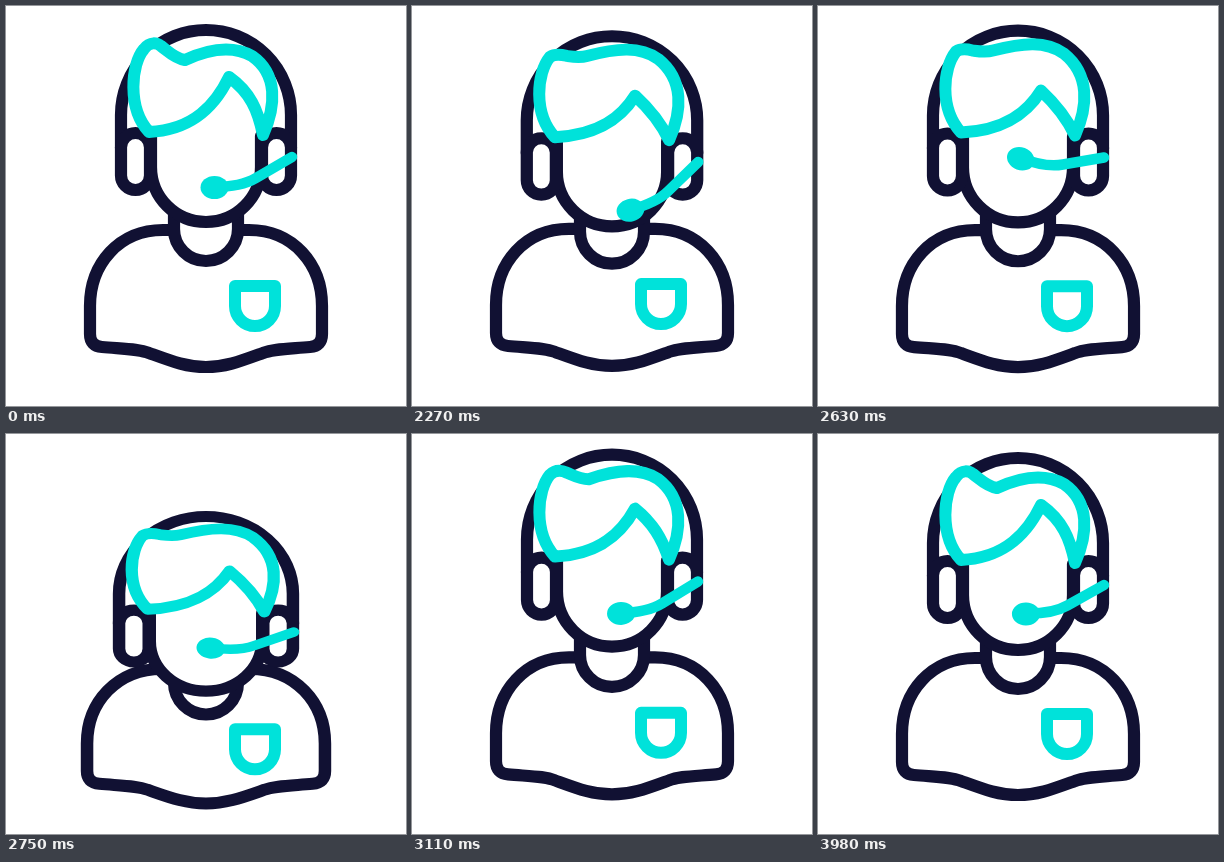
Recreate the animation shown at these times as an HTML page. Size 400x400 px, loop 4.01 s.

```html
<!DOCTYPE html>
<html lang="en">
<head>
<meta charset="utf-8">
<title>Support agent</title>
<style>
  html, body { margin: 0; width: 100%; height: 100%; overflow: hidden; background: #fff; }
  svg { display: block; width: 100%; height: 100%; }
  path, rect { fill: #fff; stroke: #111133; stroke-width: 12.2; stroke-linecap: round; stroke-linejoin: round; }
  .teal { stroke: #00e2da; stroke-width: 12; }
  .boom { fill: none; stroke-width: 10.5; }
  .dot { fill: #00e2da; }
</style>
</head>
<body>
<svg viewBox="0 0 400 400">
  <path id="body" d="M168 224H157C113 224 84 258 84 300V328Q84 340 96 341C120 343 133 343 143 347C165 355 180 361 200 361C220 361 235 355 257 347C267 343 280 343 304 341Q316 340 316 328V300C316 258 287 224 243 224H232"/>
  <path id="pocket" class="teal" d="M229 280H269V300A20 20 0 0 1 229 300Z"/>
  <path id="collar" d="M168 195V223A32 32 0 0 0 232 223V195"/>
  <g id="head">
    <path d="M115 142V109A85 85 0 0 1 285 109V142"/>
    <path d="M145 130V161A55 55 0 0 0 255 161V130"/>
    <rect x="115" y="127" width="29" height="57" rx="14.500"/>
    <rect x="256" y="127" width="29" height="57" rx="14.500"/>
    <path id="hair" class="teal"/>
    <g id="mic">
      <path class="teal boom" d="M286 151L250 172Q235 181 208 181"/>
      <ellipse class="dot" cx="208.500" cy="181.500" rx="14" ry="11.500"/>
    </g>
  </g>
</svg>
<script>
const LOOP = 4010, START = 2000, SECOND = 2630, MIC_PEAK = 2650;
const el = id => document.getElementById(id);
const clamp = x => Math.min(1, Math.max(0, x));
const arch = x => Math.sin(Math.PI * clamp(x));
const smooth = (a, b, t) => { const x = clamp((t - a) / (b - a)); return x * x * (3 - 2 * x); };

// A dip followed by a rise, each half a sine wave; down is positive.
const hop = (s, dipTime, riseTime, dip, rise) =>
  dip * arch(s / dipTime) - rise * arch((s - dipTime) / riseTime);

// The microphone swings up to its peak, then rings out.
function swing(t) {
  const grow = clamp((t - START) / 320);
  const fade = Math.exp(-Math.max(0, t - MIC_PEAK) / 500);
  return 21 * grow * fade * Math.cos(2 * Math.PI * (t - MIC_PEAK) / 630);
}

function hairPath(h) {
  return `M143 126C121 102 125 ${58 + 3 * h} 138 ${43 + 2 * h}
    C144 ${35 + 6 * h} 151 ${37 + 6 * h} 155 ${40 + 4 * h}
    C162 45 168 ${52 - 6 * h} ${179 - 4 * h} ${54 - 10 * h}
    C205 ${42 - 6 * h} 228 ${40 - 6 * h} 246 ${50 - 3 * h}
    C272 68 270 100 257 129
    C${252 - 4 * h} ${104 + 6 * h} ${244 - 7 * h} ${86 + 11 * h} 223 ${71 + 13 * h}
    C210 ${98 + 7 * h} 188 124 143 126Z`;
}

const move = (id, value) => el(id).setAttribute("transform", value);
const about = (x, y, dy, sx, sy) => `translate(${x} ${y + dy}) scale(${sx} ${sy}) translate(${-x} ${-y})`;

function draw(now) {
  const time = now % LOOP;
  const t = time < START + 30 ? START : time;
  const first = t - START, second = t - SECOND;

  const head = hop(first, 300, 330, 14.5, 17.5) + hop(second, 315, 180, 44, 14);
  const body = hop(first, 250, 250, 9, 4) + hop(second, 310, 180, 9, 4);
  const squash = Math.max(0, head) * .0022;
  const wide = Math.max(0, body) * .003;

  move("head", about(200, 216, head, 1 + squash * .25, 1 - squash));
  move("body", about(200, 361, body, 1 + wide, 1 - wide * .7));
  move("pocket", `translate(0 ${body * 1.8})`);
  move("collar", `translate(0 ${head * .62})`);
  move("mic", `rotate(${swing(t)} 286 151)`);
  el("hair").setAttribute("d", hairPath(smooth(2060, 2270, t) - smooth(2940, 3300, t)));
  requestAnimationFrame(draw);
}
requestAnimationFrame(draw);
</script>
</body>
</html>
```
